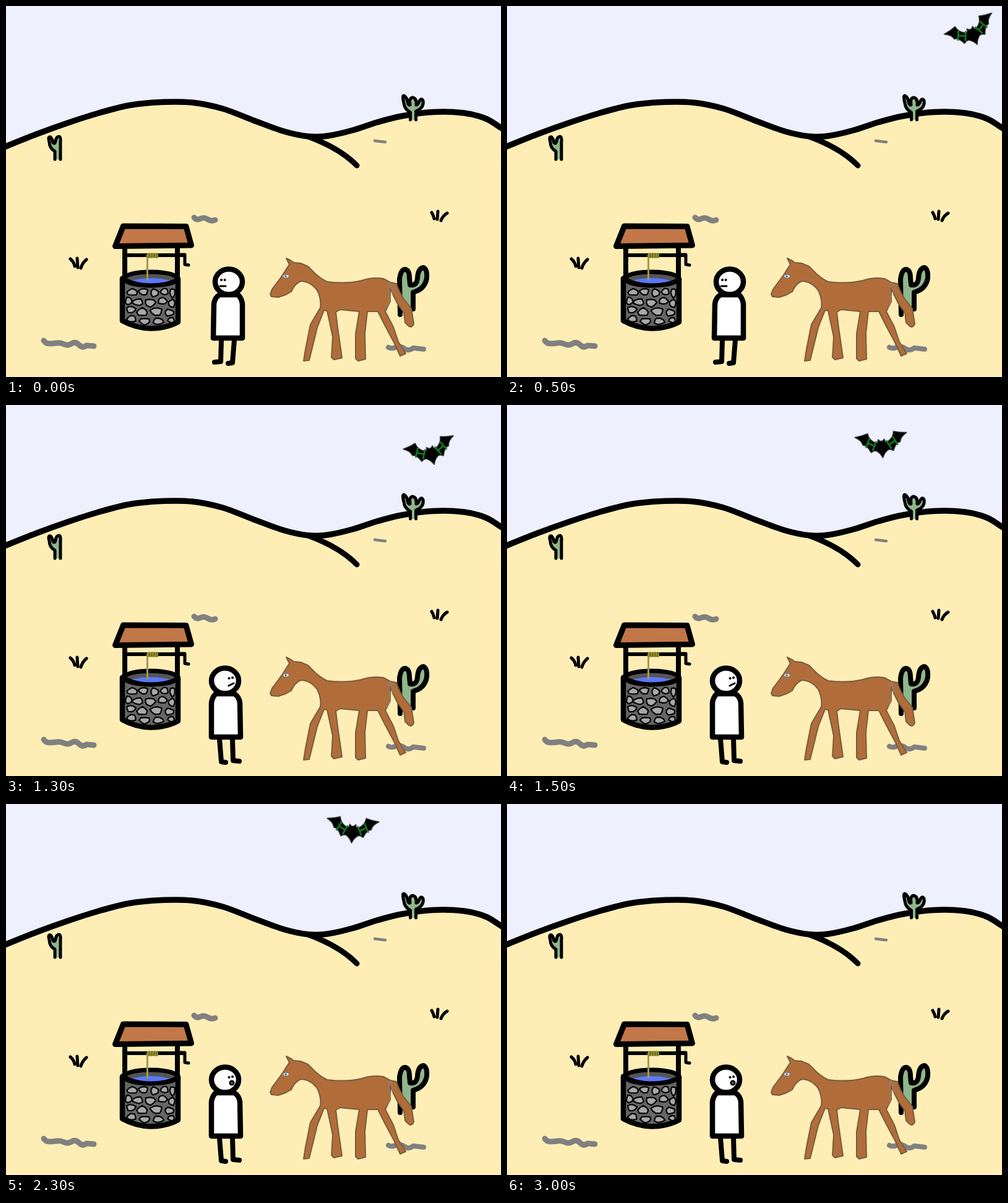
These frames come from a looping animation (800 by 600 pixels, 3500 ms). An HTML page:

```html
<!DOCTYPE html>
<html lang="en">
<head>
<meta charset="utf-8">
<title>Desert well</title>
<style>
  html, body { margin: 0; width: 100%; height: 100%; overflow: hidden; background: #eef0fe; }
  svg { display: block; width: 800px; height: 600px; }
  .ink { fill: none; stroke: #000; stroke-linecap: round; stroke-linejoin: round; }
  .cactus { fill: #8fb78b; }
  .pebble { fill: none; stroke: #808080; stroke-linecap: round; stroke-linejoin: round; }
  .bat, .body, .face { animation: 3.5s step-end infinite; }
  .bat { animation-name: fly; }
  .body { animation-name: turn; }
  .left { animation-name: left; }
  .right { animation-name: right; }
  .flat { animation-name: flat; }
  .open { animation-name: open; }

  @keyframes fly {
    0% { visibility: hidden; transform: translate(800px, 0); }
    14.2857% { visibility: visible; transform: translate(745px, 28.5px) rotate(-24deg); }
    28.5714% { visibility: visible; transform: translate(682.5px, 60.5px) rotate(-15deg); }
    42.8571% { visibility: visible; transform: translate(604px, 48.5px) rotate(-5.5deg); }
    57.1429% { visibility: visible; transform: translate(561px, 26px) rotate(4deg); }
    71.4286% { visibility: visible; transform: translate(476px, -8px) rotate(4deg); }
    85.7143%, 100% { visibility: hidden; transform: translate(476px, -60px); }
  }
  @keyframes turn {
    0% { transform: none; }
    28.5714%, 100% { transform: translate(714px, 0) scaleX(-1); }
  }
  @keyframes left { 0% { visibility: visible; } 28.5714%, 100% { visibility: hidden; } }
  @keyframes right { 0% { visibility: hidden; } 28.5714%, 100% { visibility: visible; } }
  @keyframes flat { 0% { visibility: hidden; } 28.5714% { visibility: visible; } 57.1429%, 100% { visibility: hidden; } }
  @keyframes open { 0% { visibility: hidden; } 57.1429%, 100% { visibility: visible; } }
</style>
</head>
<body>
<svg viewBox="0 0 800 600">
  <rect width="800" height="600" fill="#eef0fe"/>

  <!-- dunes -->
  <path id="sand" fill="#feeeb5"/>
  <path id="ridge" class="ink" stroke-width="9.500"/>
  <path class="ink" stroke-width="9" d="M488 211Q540 230 567 258"/>

  <!-- pebbles -->
  <g class="pebble">
    <path stroke-width="9" d="M61 541Q64 546 70 546T82 545T94 547T106 546T118 548T130 549L142 550"/>
    <path stroke-width="9" d="M304 342Q308 347 314 344T326 345T338 346"/>
    <path stroke-width="4.500" d="M596 218L604 219L613 220"/>
    <path stroke-width="8" d="M618 552Q623 555 630 552T644 554T658 553L675 555"/>
  </g>

  <!-- plants -->
  <g class="ink">
    <path stroke-width="5" d="M104 409Q110 414 111 421M115 408L116 423M130 410Q123 416 121 424M688 334Q691 339 692 344M698 332L697 345M713 335Q706 339 703 347"/>
    <path class="cactus" stroke-width="5" d="M79 248V235Q70 230 70 220Q67 211 72 212Q75 215 76 221Q79 224 80 219Q81 211 86 211Q89 212 88 220V248"/>
    <path class="cactus" stroke-width="5" d="M653.500 184V172Q644 167 643 157Q640 145 643 145Q648 148 649 155Q650 161 653 160Q651 149 657 148Q664 149 663 160Q666 160 668 154Q671 148 674 153Q676 165 662.500 170V184"/>
    <path class="cactus" stroke-width="8" d="M637 499L636 442Q638 425 646 426Q652 428 652 440L653 451Q664 453 665 440Q666 424 675 423Q681 426 680 440Q677 458 658 463L658 490"/>
  </g>

  <!-- well -->
  <g class="ink">
    <path stroke-width="8" d="M192 388V440M277 388V440"/>
    <path stroke-width="6" d="M193 403H288"/>
    <path stroke-width="5" d="M281 402H289V418L295 419"/>
    <path stroke-width="8.500" fill="#666" d="M188 441V509Q210 521 234 521.500Q260 521 278 511V441"/>
    <ellipse cx="234" cy="441" rx="43" ry="11" fill="#555" stroke-width="7"/>
    <path fill="#5b78fa" stroke="none" d="M199 445Q234 435 269 445Q252 451 234 451Q214 451 199 445Z"/>
    <path stroke-width="7" d="M188 440Q206 452 234 452T278 442"/>
    <g id="stones" fill="#a8a8a8" stroke-width="2.200"></g>
    <path stroke="#a39a45" stroke-width="3" stroke-linecap="butt" d="M228.500 402V444"/>
    <path stroke="#8f8a2e" stroke-width="8" stroke-linecap="butt" d="M228 403.500H246"/>
    <path stroke="#5d5a18" stroke-width="1" d="M232 400L231 407M236 400L235 407M240 400L239 407M244 400L243 407"/>
    <path stroke-width="9" fill="#c17748" d="M189.500 356L291 356.500L299.500 387L176.500 388.500Z"/>
  </g>

  <!-- horse -->
  <g stroke="#7a5a40" stroke-width="2" stroke-linejoin="round" fill="#b16d39">
    <path d="M427 466L430 458L442 442L447 435L454 424L458 418L453 408L461 412L465 415L476 416L488 421L500 433Q510 442 519 446Q550 450 575 444Q592 438 610 441L621 447L631 449Q636 464 643 474L655 489L659 514Q656 521 651 518L645 512L643 496L633 482L625 466L621 456L621 478L613 494L626 519L634 543L646 562L637 566L628 546L612 516L601 494H584L580 530L581 571L569 574L565 570V530L571 494L540 491L533 495L536 520L543 569L530 572L526 568L528 535L519 493L514 492L503 520L490 573L481 574L484 555L492 515L508 488Q510 474 503 460Q492 445 476 445Q466 450 461 462L452 467L440 471L429 470Z"/>
    <path fill="none" stroke="#8b8178" stroke-width="1.300" d="M621 447Q617 452 620 464T616 489M621 447L625 466"/>
    <ellipse cx="452.500" cy="437" rx="5" ry="3" fill="#dce1e8" stroke="#7e7772" stroke-width="1.300"/>
    <circle cx="452" cy="437" r="1.500" fill="#556" stroke="none"/>
  </g>

  <!-- man -->
  <g class="ink">
    <g class="body">
      <path stroke-width="8" d="M348 540L347 575L337 576M369 540L366 577L359 578"/>
      <path stroke-width="8.500" fill="#fff" d="M345 467Q337 472 336 482L335 537H382V482Q381 473 375 467Z"/>
      <ellipse cx="360" cy="446" rx="22" ry="20.500" fill="#fff" stroke-width="8.500"/>
    </g>
    <g class="face left">
      <path stroke-width="4" d="M348 443h.1M353.500 443h.1"/>
      <path stroke-width="3" d="M346 453H355"/>
    </g>
    <path class="face right" stroke-width="4" d="M360.500 442h.1M366 441h.1"/>
    <path class="face flat" stroke-width="3" d="M360 454L368 450"/>
    <circle class="face open" cx="365" cy="451" r="3" fill="#777" stroke-width="3"/>
  </g>

  <!-- bat -->
  <g class="bat">
    <path stroke="#222" stroke-width="1.500" stroke-linejoin="round" d="M-42 0Q-30 -1 -21 -4Q-20 6 -10 12L-6 12L-5 7L-2 10H2L5 7L6 12L10 12Q20 6 21 -4Q30 -1 42 0Q32 5 30 14Q24 13 18 27Q11 22 7 27Q3 30 0 37Q-3 30 -7 27Q-11 22 -18 27Q-24 13 -30 14Q-32 5 -42 0Z"/>
    <g fill="none" stroke="#127a20" stroke-width="2.800" stroke-linecap="round">
      <path transform="translate(-17 14) rotate(27)" d="M-6 -7V7M6 -7V7M-6 0H6"/>
      <path transform="translate(17 14) rotate(-27)" d="M-6 -7V7M6 -7V7M-6 0H6"/>
    </g>
  </g>
</svg>
<script>
  const byId = id => document.getElementById(id);

  // Smooth curve through points spread over the dunes
  const crest = [
    [-50, 248], [0, 227], [50, 207], [100, 189], [150, 173], [200, 160.5], [250, 155.5], [300, 156],
    [350, 166], [400, 185], [450, 203], [490, 211], [520, 210], [560, 201], [600, 188],
    [640, 178], [690, 171.5], [740, 173], [775, 182], [800, 197], [830, 216]
  ];
  const smooth = pts => {
    let d = `M${pts[0]}`;
    for (let i = 0; i < pts.length - 1; i++) {
      const a = pts[Math.max(i - 1, 0)], b = pts[i], c = pts[i + 1], e = pts[Math.min(i + 2, pts.length - 1)];
      d += `C${b.map((v, k) => v + (c[k] - a[k]) / 6)} ${c.map((v, k) => v - (e[k] - b[k]) / 6)} ${c}`;
    }
    return d;
  };
  const ridge = smooth(crest);
  byId("ridge").setAttribute("d", ridge);
  byId("sand").setAttribute("d", ridge + "V600H-50Z");

  // Irregular stones: [x, y, half width, half height]
  const stones = [
    [204, 463, 8, 5], [222, 462, 7, 5], [240, 464, 6, 6], [256, 462, 6, 5], [269, 464, 4, 7],
    [198, 477, 5, 6], [213, 479, 8, 5], [233, 480, 8, 6], [253, 477, 7, 5], [268, 481, 5, 6],
    [202, 491, 7, 5], [220, 495, 8, 6], [243, 494, 9, 6], [264, 496, 7, 5],
    [203, 506, 7, 5], [224, 510, 8, 5], [246, 510, 8, 5], [267, 508, 5, 4]
  ];
  const outline = ([x, y, w, h], i) => {
    const points = [];
    for (let k = 0; k < 8; k++) {
      const a = k * Math.PI / 4 + i;
      const r = 1.05 + 0.15 * Math.sin(i * 7 + k * 2.3);
      points.push((x + w * r * Math.cos(a)).toFixed(1) + "," + (y + h * r * Math.sin(a)).toFixed(1));
    }
    return `<polygon points="${points.join(" ")}"/>`;
  };
  byId("stones").innerHTML = stones.map(outline).join("");
</script>
</body>
</html>
```
